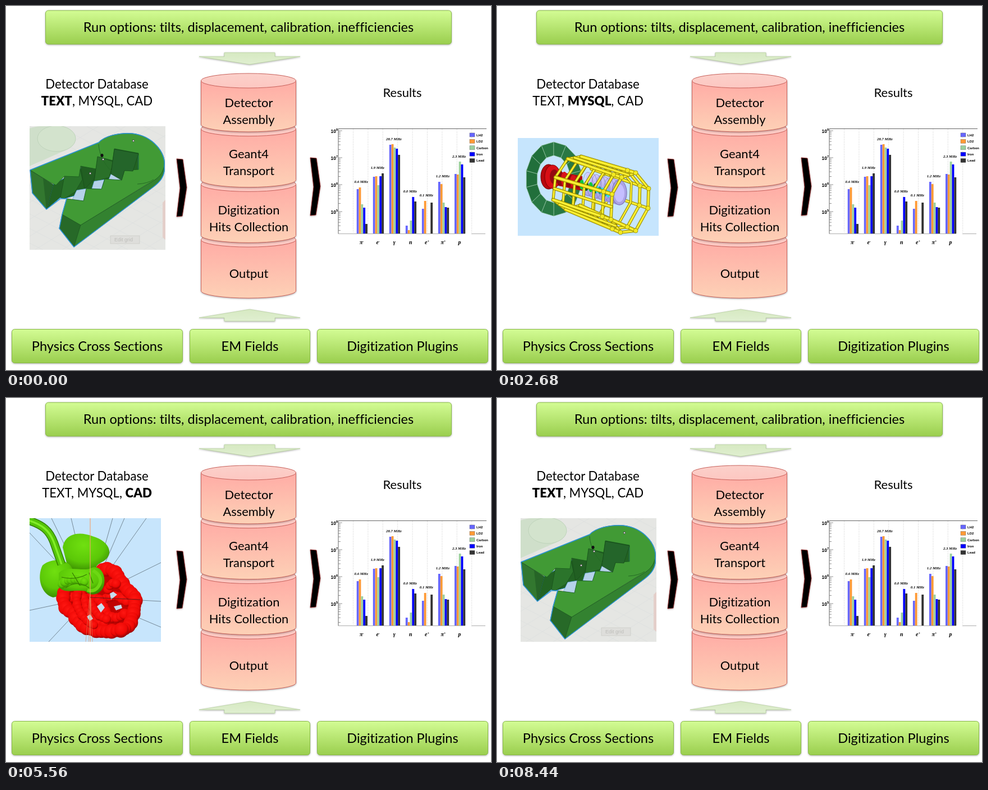
Recreate the animation shown at these times as an HTML page. Size 864 px wide and 648 px high, loop 8.64 s.

```html
<!DOCTYPE html>
<html lang="en">
<head>
<meta charset="utf-8">
<title>Simulation pipeline</title>
<style>
html, body { margin: 0; width: 100%; height: 100%; overflow: hidden; background: #fff; }
svg { display: block; width: 864px; height: 648px; }
text { font-family: Lato, Inter, sans-serif; font-variant-ligatures: none; text-anchor: middle; fill: #000; }
.serif { font: italic bold 6.8px "Liberation Serif", serif; }
.sans { font: bold 6px "Liberation Sans", sans-serif; text-anchor: start; }
.shadow { filter: drop-shadow(0 1.5px 1.5px rgba(0,0,0,.3)); }
#scenes { isolation: isolate; }
#scenes > g { mix-blend-mode: plus-lighter; }
</style>
</head>
<body>
<svg id="stage" viewBox="0 0 864 648">
  <defs>
    <linearGradient id="lime" x2="0" y2="1"><stop stop-color="#d3fc94"/><stop offset="1" stop-color="#9ace4e"/></linearGradient>
    <linearGradient id="pale" x2="0" y2="1"><stop stop-color="#d6e9c2"/><stop offset="1" stop-color="#e0efd0"/></linearGradient>
    <linearGradient id="peach" x2="0" y2="1"><stop stop-color="#ffaba5"/><stop offset="1" stop-color="#fdd1b6"/></linearGradient>
    <linearGradient id="lid" x2="0" y2="1"><stop stop-color="#fbd0ca"/><stop offset="1" stop-color="#fdc7c1"/></linearGradient>
    <radialGradient id="redBall" cx=".42" cy=".36" r=".68"><stop stop-color="#ff1712"/><stop offset=".65" stop-color="#ee0805"/><stop offset="1" stop-color="#8e0000"/></radialGradient>
    <radialGradient id="greenBall" cx=".45" cy=".3" r=".75"><stop stop-color="#70e010"/><stop offset=".6" stop-color="#5bc807"/><stop offset="1" stop-color="#348200"/></radialGradient>
    <linearGradient id="drum" x2="0" y2="1"><stop stop-color="#d6d0ff"/><stop offset="1" stop-color="#9a91dc"/></linearGradient>
    <clipPath id="clipBlock"><path d="M42 214H284V434H42Z"/></clipPath>
    <clipPath id="clipOrgan"><path d="M42 214H276V434H42Z"/></clipPath>
  </defs>
  <g id="diagram"></g>
  <g id="chart"></g>
  <g id="scenes"><g></g><g></g><g></g></g>
</svg>
<script>
const NS = 'http://www.w3.org/2000/svg';
const $ = id => document.getElementById(id);

function add(parent, tag, attrs, content) {
  const node = document.createElementNS(NS, tag);
  for (const key in attrs) node.setAttribute(key, attrs[key]);
  if (content !== undefined) node.innerHTML = content;
  return parent.appendChild(node);
}
const path = (g, d, fill, stroke = 'none', width = 1, more = {}) =>
  add(g, 'path', { d, fill, stroke, 'stroke-width': width, 'stroke-linejoin': 'round', ...more });
const line = (g, d, stroke, width = 1, more) => path(g, d, 'none', stroke, width, more);
const oval = (g, cx, cy, rx, ry, fill, more = {}) => add(g, 'ellipse', { cx, cy, rx, ry, fill, ...more });
const rect = (g, x, y, width, height, fill, more = {}) => add(g, 'rect', { x, y, width, height, fill, ...more });
const label = (g, x, y, content, size) => add(g, 'text', { x, y, 'font-size': size }, content);
const mix = (a, b, k) => a.map((v, i) => v + (b[i] - v) * k);
const open = points => 'M' + points.map(p => p.join()).join('L');
const poly = points => open(points) + 'Z';

function drawDiagram(g) {
  const button = (x, y, w, h, text) => {
    rect(g, x, y, w, h, 'url(#lime)', { rx: 5, stroke: '#88b848', class: 'shadow' });
    label(g, x + w / 2, y + 38, text, 23.6);
  };
  button(70.5, 8, 723, 60, 'Run options: tilts, displacement, calibration, inefficiencies');
  button(10.5, 575.5, 304, 60, 'Physics Cross Sections');
  button(327.5, 575.5, 214, 60, 'EM Fields');
  button(554.5, 575.5, 304, 60, 'Digitization Plugins');

  path(g, 'M389 83H479V90H524L434 104L344 90H389Z', 'url(#pale)', '#b4cf9a', .7, { class: 'shadow' });
  path(g, 'M434 540L524 555H479V561H389V555H344Z', 'url(#pale)', '#b4cf9a', .7, { class: 'shadow' });

  const steps = [['Detector', 'Assembly'], ['Geant4', 'Transport'], ['Digitization', 'Hits Collection'], ['Output']];
  const textTop = [180, 271, 371, 484];
  for (let i = 3; i >= 0; i--) {
    const bottom = 211 + i * 98.7, top = i ? bottom - 91 : 133;
    path(g, `M347.5 ${top}V${bottom}A84.5 13 0 0 0 516.5 ${bottom}V${top}Z`,
      'url(#peach)', '#c7615b', 1, { class: 'shadow' });
    oval(g, 432, top, 84.5, 13, 'url(#lid)', { stroke: '#c7615b' });
  }
  steps.forEach((rows, i) => rows.forEach((row, j) => label(g, 432.5, textTop[i] + j * 29.7, row, 21.9)));

  const chevron = (x, y) => path(g, `M${x} ${y}L${x + 11} ${y + 1}L${x + 18} ${y + 51}L${x + 10} ${y + 102}L${x} ${y + 103}L${x + 6} ${y + 52}Z`,
    '#000', '#a32020', .8, { class: 'shadow' });
  chevron(304, 272);
  chevron(542, 270);
  label(g, 706, 162, 'Results', 22);
}

function drawChart(g) {
  const colors = ['#6666ff', '#ff9a36', '#9bd09e', '#0000ff', '#333333'];
  const groups = [
    ['π<tspan dy="-3" font-size="6">-</tspan>', '0.6', 315, [326, 323, 353, 359, 388]],
    ['e<tspan dy="-3" font-size="6">-</tspan>', '1.9', 290, [304, 303, 319, 303, 298]],
    ['γ', '28.7', 239, [247, 246, 252, 254, 265]],
    ['n', '0.0', 332, [391, 399, 382, 340, 348]],
    ['e<tspan dy="-3" font-size="6">+</tspan>', '0.1', 339, [361, 347, 405, 405, 350]],
    ['π<tspan dy="-3" font-size="6">+</tspan>', '1.2', 305, [313, 317, 350, 358, 359]],
    ['p', '2.3', 270, [299, 300, 277, 282, 305]],
  ];
  for (let i = 0; i < 9; i++) line(g, `M${618.5 + i * 26.4} 219V405`, '#b4b4b4', .8, { 'stroke-dasharray': '1 2' });
  line(g, 'M592 405.5V218.5H856', '#666');
  line(g, 'M592 405.5H818M829 405.5H854', '#999', .8);
  for (let decade = 4; decade <= 8; decade++) {
    const y = 222 + (8 - decade) * 48;
    for (let n = 1; n < 10; n++) {
      const tick = y - Math.log10(n) * 48;
      if (tick > 218 && tick < 405) line(g, `M592 ${tick}h${n === 1 ? 7 : 4}`, '#666', .7);
    }
    if (decade > 4) add(g, 'text', { x: 578.5, y: y + 3.5, class: 'sans', style: 'font-size:8.5px' },
      `10<tspan dy="-3.5" font-size="5.5">${decade}</tspan>`);
  }
  groups.forEach(([name, rate, y, tops], i) => {
    const x = 624.7 + i * 29.05;
    tops.forEach((top, k) => rect(g, x + k * 3.85, top, 3.85, 405 - top, colors[k]));
    add(g, 'text', { x: x + 9, y: 424, class: 'serif', style: 'font-size:10px' }, name);
    add(g, 'text', { x: x + 8, y, class: 'serif' }, rate + ' MHz');
  });
  ['LH2', 'LD2', 'Carbon', 'Iron', 'Lead'].forEach((name, i) => {
    const y = 226 + i * 11.4;
    rect(g, 826, y, 9, 7, colors[i], { stroke: '#555', 'stroke-width': .4 });
    add(g, 'text', { x: 838, y: y + 5.8, class: 'sans' }, name);
  });
}

function caption(g, bold) {
  label(g, 162, 147, 'Detector Database', 22.2);
  const words = ['TEXT', 'MYSQL', 'CAD'].map((w, i) => i === bold ? `<tspan font-weight="900">${w}</tspan>` : w);
  label(g, 162, 177, words.join(', '), 22.2);
}

function drawBlock(scene) {
  const g = add(scene, 'g', { 'clip-path': 'url(#clipBlock)' });
  rect(g, 42, 214, 242, 220, '#e5e6e3');
  for (let i = -6; i < 14; i++) {
    line(g, `M42 ${214 + i * 26}l242 124M42 ${260 + i * 30}l242 -150`, '#dcdfdf', .7);
  }
  path(g, 'M42 218C70 208 115 215 123 235C126 250 105 258 92 263L42 285Z', '#cfdfca');
  oval(g, 90, 236, 34, 23, '#d3e3cd', { stroke: '#bfd4bb' });
  path(g, 'M284 345L279 350V412L284 416Z', '#e4cfca');
  rect(g, 186, 409, 52, 14, '#dededb', { stroke: '#c8c8c4', 'stroke-width': .7 });
  add(g, 'text', { x: 193, y: 419, class: 'sans', style: 'font-size:9px;font-weight:400;fill:#bdbdb9' }, 'Edit grid');

  path(g, 'M84 318L193 254L236 262V292L143 332L104 343L97 341L72 362Z', '#226323', '#2b8ed0', 1);
  const facet = (d, fill) => path(g, d, fill, '#174c1a', .7);
  facet('M104 303L131 285L136 309L123 331L104 343L97 341Z', '#2b742b');
  facet('M133 285L163 268L157 308L140 326Z', '#215f22');
  facet('M163 268L191 277L184 305L157 313Z', '#2a7029');
  facet('M193 254L236 262L225 293L187 299Z', '#1f5b20');
  path(g, 'M126 328L144 325L138 347L118 345ZM157 312L175 309L170 326L153 325ZM188 297L205 294L204 310L183 309Z', '#b6d2ea', '#5aa4d8', .7);
  path(g, 'M43 292L84 318L72 362L47 333Z', '#32772f', '#16451b', .8);
  path(g, 'M66 306L84 318L72 362Z', '#266427');
  path(g, 'M100 371L133 390L121 429L95 396Z', '#276928', '#174c1a', .8);
  path(g, 'M133 390L258 314Q278 303 282 280V294Q280 309 264 321L121 429Z', '#338230', '#1d5c20', .8);
  path(g, `M43 292L165 243C175 232 200 225 225 227C262 231 285 262 282 282C280 302 266 310 252 317L133 390L100 371
    L108 343L138 347L143 325L170 326L176 308L206 310L211 293L236 291V262L193 254L190 275L163 268L160 290L133 285
    L130 304L104 303L89 319L79 314Z`, '#419a35', '#195a1c', .8);
  path(g, 'M193 255L236 263L226 294L211 293L206 310L187 299Z', '#24652a', '#174c1a', .7);
  line(g, 'M165 246C166 268 180 288 190 296M234 317Q252 316 263 309', '#246a25', 1);
  line(g, 'M72 362L47 333L43 292L165 243C175 232 200 225 225 227C262 231 285 262 282 284V294Q280 309 264 321L121 429L95 396L100 371L108 343H97L72 362',
    '#2a94da', 1.5, { 'stroke-linecap': 'round' });
  oval(g, 171, 266, 2.6, 3, '#111');
  for (const [x, y] of [[173, 273], [227, 240], [150, 298]]) rect(g, x - 1.5, y - 1.5, 3, 3, '#ddd', { stroke: '#333', 'stroke-width': .6 });
}

function drawDetector(g) {
  rect(g, 37, 235, 251, 174, '#c6e5fd');
  const ringPoint = (i, rx, ry) => {
    const a = (i + .5) * Math.PI / 7;
    return [101 + rx * Math.cos(a), 308 + ry * Math.sin(a)];
  };
  for (let i = 0; i < 14; i++) {
    path(g, poly([ringPoint(i, 50, 66), ringPoint(i + 1, 50, 66), ringPoint(i + 1, 30, 42), ringPoint(i, 30, 42)]),
      i > 4 && i < 9 ? '#216f3b' : '#297844', '#9cc9a8', .7);
  }

  const back = [[150, 268], [168, 290], [166, 325], [148, 355], [122, 362], [100, 345], [104, 305], [126, 272]];
  const front = [[247, 297], [270, 325], [269, 360], [247, 400], [220, 403], [203, 380], [205, 335], [222, 305]];
  const tube = (d, w) => {
    const caps = { 'stroke-linecap': 'round' };
    line(g, d, '#857b00', w + .6, caps);
    line(g, d, '#e3d512', w - 1, caps);
    line(g, d, '#fff23c', w * .4, caps);
  };
  const near = [3, 4, 5, 6, 7, 0];
  const slice = k => back.map((p, i) => mix(p, front[i], k));
  const side = (i, shift) => [back, front].map(ring => mix(ring[i], ring[(i + 1) % 8], shift));
  const rod = (i, w, shift = 0) => tube(open(side(i, shift)), w);

  [1, 2, 3].forEach(i => rod(i, 5));
  [.35, .7].forEach(k => tube(poly(slice(k)), 4));
  path(g, 'M100 293L152 303V329L100 318Z', '#b20a10');
  oval(g, 92, 304, 14, 22, '#b8080e', { stroke: '#6d0004' });
  oval(g, 99, 304, 14, 21, '#d80f16', { stroke: '#7d0004' });
  oval(g, 102, 304, 8, 13, '#930a10');
  for (let i = 0; i < 5; i++) oval(g, 112 + i * 8, 306 + i * 2, 6, 14 - i, i % 2 ? '#d91319' : '#8c0910');
  path(g, 'M159 296L221 310Q233 317 231 340Q227 357 215 354L156 337Z', 'url(#drum)');
  for (let i = 0; i < 8; i++) oval(g, 162 + i * 7.5, 317 + i * 2, 9, 21, 'none', { stroke: '#827abd', 'stroke-width': .7 });
  oval(g, 218, 332, 13, 22, '#aba3e5', { stroke: '#7770b4' });
  oval(g, 218, 333, 9, 16, '#c5beff');
  for (let i = 0; i < 4; i++) oval(g, 151 + i * 8, 318 + i * 2.2, 4, 9, i % 2 ? '#075f20' : '#10c83b');
  for (let i = 0; i < 5; i++) oval(g, 178 + i * 5, 326 + i * 2, 3, 7, i % 2 ? '#1b979f' : '#30e2e0');

  [0, .17, .34, .51, .68].forEach(k => {
    const ring = slice(k);
    tube(open(near.map(i => ring[i])), 4.5);
  });
  [.85, 1].forEach(k => tube(poly(slice(k)), 5));
  near.forEach(i => rod(i, 6));
  [4, 5, 7].forEach(i => rod(i, 5, .5));
  [...front, ...slice(.85)].forEach(([x, y]) => oval(g, x, y, 4, 4, '#f3e922', { stroke: '#857b00', 'stroke-width': .7 }));
}

function drawOrgan(scene) {
  const g = add(scene, 'g', { 'clip-path': 'url(#clipOrgan)' });
  rect(g, 42, 214, 234, 220, '#c7e5fc');
  const rays = [[42, 378], [42, 240], [81, 214], [116, 214], [190, 214], [211, 214], [250, 214], [276, 293], [276, 362], [276, 408], [76, 434]];
  rays.forEach(p => line(g, `M150 355L${p}`, '#52606a', .7));

  const chain = (d, r, step, fill) => {
    const guide = line(g, d, 'none');
    const length = guide.getTotalLength();
    for (let s = 0, i = 0; s <= length; s += step, i++) {
      const p = guide.getPointAtLength(s), size = r * (1 + .1 * Math.sin(i * 2.4));
      oval(g, p.x, p.y, size, size, fill);
    }
    guide.remove();
  };

  path(g, 'M101 266C105 241 130 237 154 246C176 252 188 267 183 280C176 296 156 292 162 308L112 309Z', 'url(#greenBall)');
  path(g, 'M65 298C83 283 113 287 119 306C119 334 108 351 84 355C63 350 54 320 65 298Z', 'url(#greenBall)');
  const gullet = 'M37 217C65 225 78 236 86 259Q92 276 99 296';
  line(g, gullet, '#327d00', 15);
  line(g, gullet, '#55c507', 12);
  line(g, gullet, '#83ed29', 3.5);

  path(g, 'M103 340L172 306L202 321L231 354L221 404L186 415L120 385Z', '#c00402');
  chain('M166 367Q190 339 217 365M139 360Q167 344 178 382Q192 401 215 382', 9, 8, 'url(#redBall)');
  chain('M112 360Q138 337 143 370T176 401', 9, 8, 'url(#redBall)');
  chain('M172 306Q191 300 202 321T231 354Q229 382 221 404Q209 417 186 414', 12, 8, 'url(#redBall)');
  chain('M103 347Q98 376 120 383Q130 410 157 413Q180 420 212 411', 12, 9, 'url(#redBall)');
  chain('M128 347Q122 366 133 383T163 407M182 341Q188 321 201 335M151 364Q159 388 180 394', 8, 7, 'url(#redBall)');
  path(g, 'M162 371L170 365L176 373L169 382ZM185 348L191 345L198 350L187 359ZM192 371L205 368L207 374L196 378ZM144 389L150 385L155 393L149 397Z', '#c7dced');

  path(g, 'M94 312C105 296 138 310 151 303C168 295 180 317 174 335C169 351 149 354 142 344C122 340 102 350 94 335Z', 'url(#greenBall)');
  chain('M100 331Q119 316 143 329', 8, 6, 'url(#greenBall)');
  line(g, 'M99 319Q123 325 144 314M106 338Q128 323 148 338M118 311L132 334M148 311L155 330', '#337900', 1.2);
  line(g, 'M155 307Q175 319 165 335Q158 346 145 342', '#6cd813', 6);
  line(g, 'M150 214V434', '#f5a06b', 1.1);
  line(g, 'M149 355L142 434M151 355L154 434M150 355L147 434', '#d98a60', .6);
  line(g, 'M150 355L239 359', '#252525', .7);
}

drawDiagram($('diagram'));
drawChart($('chart'));
const scenes = [...$('scenes').children];
[drawBlock, drawDetector, drawOrgan].forEach((draw, i) => {
  draw(scenes[i]);
  caption(scenes[i], i);
});

const LOOP = 8640, STEP = 40;
const fades = [{ start: 2200, steps: 13 }, { start: 5120, steps: 12 }, { start: 8000, steps: 12 }];

function render(time) {
  const t = time % LOOP, weights = [1, 0, 0];
  fades.forEach(({ start, steps }, i) => {
    if (t < start) return;
    const k = Math.min(1, (Math.floor((t - start) / STEP) + 1) / steps);
    weights.fill(0);
    weights[i] = 1 - k;
    weights[(i + 1) % 3] = k;
  });
  scenes.forEach((scene, i) => {
    scene.style.opacity = weights[i];
    scene.style.display = weights[i] ? '' : 'none';
  });
}

const began = performance.now();
function tick() {
  render(performance.now() - began);
  requestAnimationFrame(tick);
}
tick();
</script>
</body>
</html>
```
